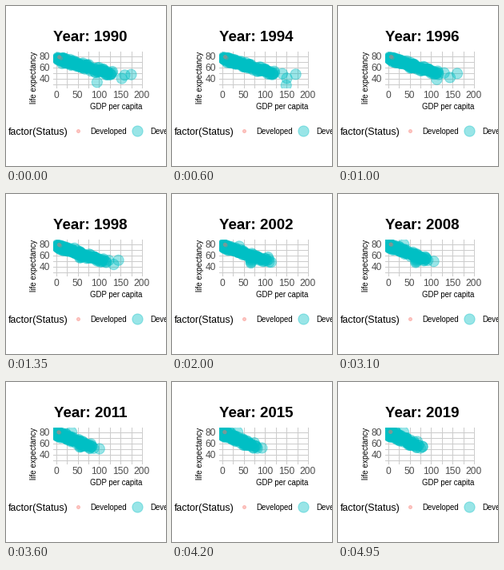
Recreate the animation shown at these times as a matplotlib script. Size 200x200 px, loop 5000 ms.

```python
import numpy as np
import matplotlib.pyplot as plt
from matplotlib.animation import FuncAnimation

W = H = 200
DPI = 100
FRAMES, INTERVAL = 100, 50
FIRST, LAST = 1990, 2019
TEAL, PINK, GRID, GREY = "#00BFC4", "#F8766D", "#CCCCCC", "#4D4D4D"
ALPHA = 0.4
R_BIG, R_SMALL = 6.6, 2.0

plt.rcParams["font.family"] = "Liberation Sans"


def pt(px):
    return px * 72 / DPI


def area(radius):
    return pt(2 * radius) ** 2


fig = plt.figure(figsize=(W / DPI, H / DPI), dpi=DPI, facecolor="white")
page = fig.add_axes([0, 0, 1, 1])
page.set(xlim=(0, W), ylim=(H, 0))
page.axis("off")

# Panel: pixel box and data scale
LEFT, TOP, RIGHT, BOTTOM = 59, 57, 171, 103
X0, Y80 = 62.7, 62.6
SX, SY = 0.536, 0.7
panel = fig.add_axes([LEFT / W, 1 - BOTTOM / H, (RIGHT - LEFT) / W, (BOTTOM - TOP) / H])
panel.set(xlim=((LEFT - X0) / SX, (RIGHT - X0) / SX),
          ylim=(80 - (BOTTOM - Y80) / SY, 80 + (Y80 - TOP) / SY))
panel.axis("off")
for gx in range(0, 201, 25):
    panel.axvline(gx, color=GRID, lw=pt(1), zorder=1)
for gy in range(30, 81, 10):
    panel.axhline(gy, color=GRID, lw=pt(1), zorder=1)


def label(x, y, s, px, ha="left", color="black", **kw):
    return page.text(x, y, s, fontsize=pt(px), ha=ha, va="baseline", color=color, **kw)


title = label(105.5, 44.5, "", 18.8, "center", weight="bold")
for v in range(0, 201, 50):
    label(X0 + v * SX, 115, str(v), 12, "center", GREY)
for v in (40, 60, 80):
    label(55, Y80 + (80 - v) * SY + 4.4, str(v), 12, "right", GREY)
label(170.5, 129, "GDP per capita", 9.6, "right")
label(38.5, 57, "life expectancy", 9.9, "right", rotation=90, rotation_mode="anchor")

label(2.5, 160.5, "factor(Status)", 12.4)
label(105, 159.5, "Developed", 9.6)
label(180.5, 159.5, "Developing", 9.6)
for x, r, c in ((89.5, R_SMALL, PINK), (164, R_BIG, TEAL)):
    page.scatter([x], [155.5], s=area(r), c=c, alpha=ALPHA, lw=pt(1))


def mix(a, b, u):
    return a + (b - a) * u


def bell(year, centre, width):
    return np.exp(-((year - centre) / width) ** 2)


def recovery(u):
    return 1 - np.exp(-(u / 0.42) ** 2.8)


rng = np.random.default_rng(7)

# Most developing countries
N_BIG = 130
big_x0 = 4 + 128 * rng.random(N_BIG) ** 1.4
big_x1 = big_x0 * (0.28 + 0.25 * (big_x0 / 132) ** 2 + 0.06 * rng.random(N_BIG))
big_y0 = 75.8 - 0.215 * big_x0 + np.clip(rng.normal(0, 2.7, N_BIG), -6, 5)
big_y1 = 79 - 0.31 * big_x1 + np.clip(rng.normal(0, 3.4, N_BIG), -6, 7)

# Developed countries
N_RICH = 34
rich_x0 = 6 + 7 * rng.random(N_RICH)
rich_x1 = 3 + 5 * rng.random(N_RICH)
rich_y0 = 79 - 0.5 * (rich_x0 - 6) - rng.random(N_RICH)
rich_y1 = 82 - 0.5 * (rich_x1 - 3) - rng.random(N_RICH)

# A setback around 2004 that later heals
N_DIP = 6
dip_x0 = np.linspace(48, 62, N_DIP)
dip = np.linspace(17, 6, N_DIP)

# Outliers: start and end x, start and end y, easing
OUTLIERS = (
    (175, 60, 47, 63, recovery),
    (153, 80, 40, 54, recovery),
    (160, 54, 46, 60, lambda u: u ** 0.8),
    (118, 80, 47, 54, lambda u: u ** 2.5),
    (45, 36, 70, 80, recovery),
)

total = N_BIG + N_RICH + N_DIP + len(OUTLIERS) + 1
order = rng.permutation(total)
small = (order >= N_BIG) & (order < N_BIG + N_RICH)


def crisis(year, u):
    """One country with a sharp spike in 1994 and a slow recovery."""
    x = mix(95, 27, u) + 40 * bell(year, 1997.5, 3.5) + 90 * bell(year, 1994, 0.65)
    y = mix(50, 69, u) - 25 * bell(year, 1992.8, 4.4)
    return x, y


def positions(year):
    u = (year - FIRST) / (LAST - FIRST)
    big = np.c_[big_x0 * (big_x1 / big_x0) ** u, mix(big_y0, big_y1, u)]
    rich = np.c_[mix(rich_x0, rich_x1, u), mix(rich_y0, rich_y1, u)]
    setback = dip * bell(year, 2004.5, 6)
    dipped = np.c_[dip_x0 + 1.4 * setback, mix(62, 57, u) - setback]
    out = [(mix(x0, x1, ease(u)), mix(y0, y1, ease(u))) for x0, x1, y0, y1, ease in OUTLIERS]
    return np.vstack([big, rich, dipped, out, [crisis(year, u)]])[order]


start = positions(FIRST)
dots = panel.scatter(start[:, 0], start[:, 1], s=np.where(small, area(R_SMALL), area(R_BIG)),
                     c=np.where(small, PINK, TEAL), alpha=ALPHA, lw=pt(1), zorder=2)


def update(i):
    year = mix(FIRST, LAST, i / (FRAMES - 1))
    title.set_text(f"Year: {round(year)}")
    dots.set_offsets(positions(year))
    return title, dots


anim = FuncAnimation(fig, update, frames=FRAMES, interval=INTERVAL, repeat=True, repeat_delay=0)
plt.show()
```
